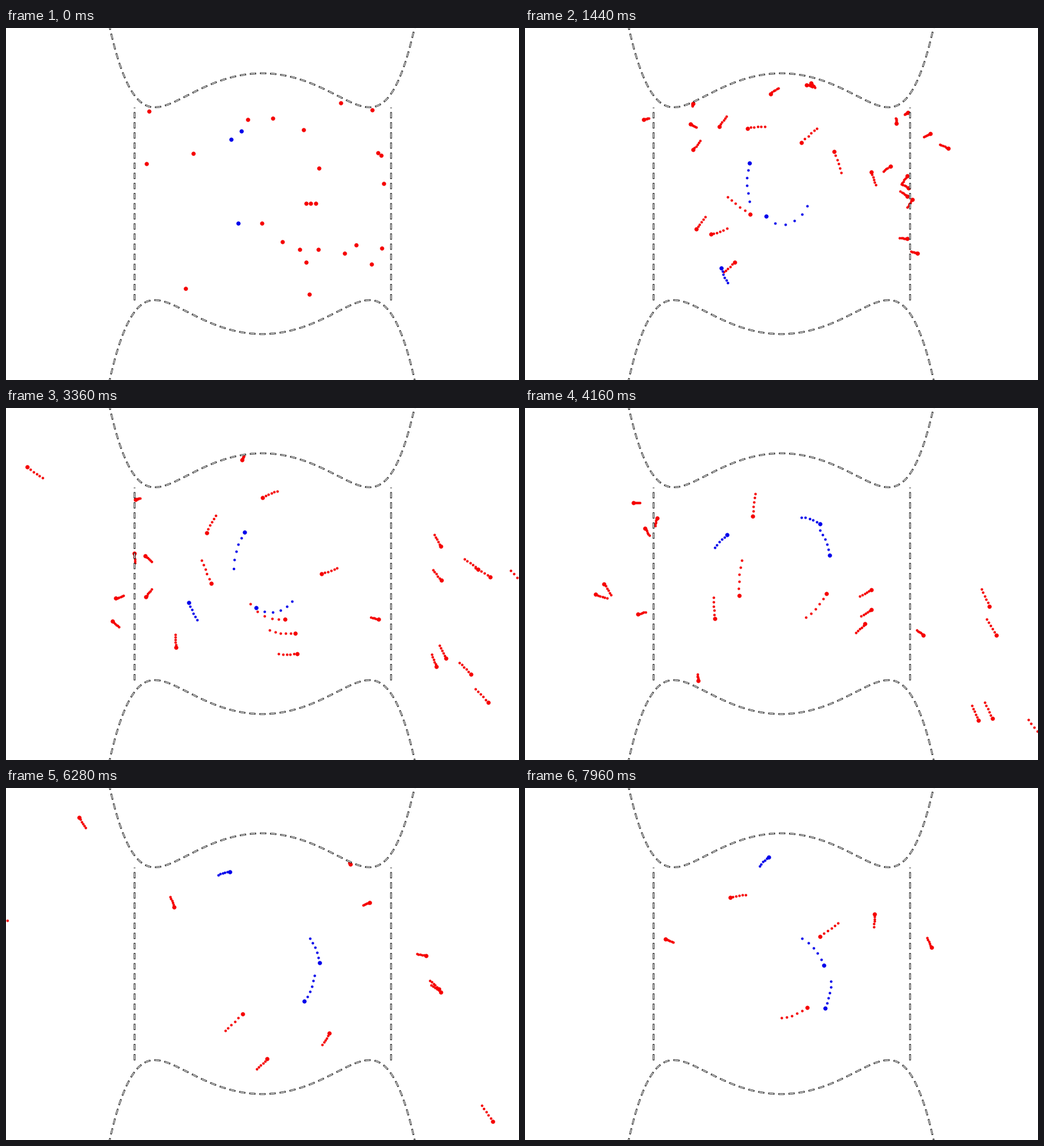
A matplotlib script that plays this animation: 800x550 px, repeating every 8 s.

```python
import numpy as np
import matplotlib.pyplot as plt
from matplotlib.animation import FuncAnimation

# Stars of equal Jacobi energy in a cluster's tidal field (Hill's equations).
# Lengths are in tidal radii; the stage spans 4 of them across and 2 down.
W, H, FRAMES, STEP = 800, 550, 200, 40
PX = 0.72                      # points per pixel at 100 dpi
CENTER = np.array([400.0, 275.0])
SCALE = np.array([200.0, 275.0])
DT, SUB = 0.0125, 8
ENERGY = 4.05
TAIL = 5
NOW = 65                       # frame at which the stars are laid out

# x, y and heading of the trail in degrees
RED = [
    (224, 138, 180), (285, 164, 74), (381, 88, 249), (377, 123, 169),
    (392, 144, 118), (365, 190, 112), (475, 135, 214), (254, 242, 123),
    (268, 257, 185), (266, 290, 96), (212, 269, 127), (214, 285, 240),
    (205, 356, 180), (342, 304, 81), (557, 218, 122), (529, 324, -3),
    (641, 159, 48), (633, 222, 32), (652, 321, 61), (644, 338, 65),
    (665, 361, 35), (685, 395, 38), (666, 212, 11), (676, 233, 0),
    (724, 197, 34), (760, 286, 51), (113, 138, 197)]
BLUE = [(465, 180, 54), (461, 267, 91), (379, 347, 118)]


def accel(p, v):
    """Central pull, tide along x and Coriolis term."""
    g = 3 / ((p**2).sum(1) + 1e-5) ** 1.5
    return np.column_stack([-2 * v[:, 1] + (3 - g) * p[:, 0],
                            2 * v[:, 0] - g * p[:, 1]])


def flow(p, v, n, sign=1):
    """Positions for n frames forward or backward (Runge-Kutta)."""
    h = sign * DT / SUB
    path = [p]
    for _ in range(n):
        for _ in range(SUB):
            a1 = accel(p, v)
            v2 = v + h / 2 * a1
            a2 = accel(p + h / 2 * v, v2)
            v3 = v + h / 2 * a2
            a3 = accel(p + h / 2 * v2, v3)
            v4 = v + h * a3
            a4 = accel(p + h * v3, v4)
            p = p + h / 6 * (v + 2 * v2 + 2 * v3 + v4)
            v = v + h / 6 * (a1 + 2 * a2 + 2 * a3 + a4)
        path.append(p)
    return np.array(path)


def velocity(p, angle):
    """Speed from the shared energy, pointing along a screen angle."""
    r = np.hypot(p[:, 0], p[:, 1])
    speed = np.sqrt(np.maximum(3 * p[:, 0]**2 + 6 / r - 2 * ENERGY, 0.02))
    way = np.column_stack([np.cos(angle), np.sin(angle)]) / SCALE
    return way * (speed / np.hypot(way[:, 0], way[:, 1]))[:, None]


def build(stars):
    """Screen tracks of all stars, shape (frame, star, 2)."""
    stars = np.array(stars, float)
    p = (stars[:, :2] - CENTER) / SCALE
    trail = np.radians(stars[:, 2])
    angle = trail.copy()
    for _ in range(15):        # turn until the trail lies as given
        d = (p - flow(p, velocity(p, angle), TAIL, -1)[-1]) * SCALE
        off = trail - np.arctan2(d[:, 1], d[:, 0])
        angle += 0.6 * np.arctan2(np.sin(off), np.cos(off))
    v = velocity(p, angle)
    past = flow(p, v, NOW, -1)[:0:-1]
    ahead = flow(p, v, FRAMES - 1 - NOW)
    return np.concatenate([past, ahead]) * SCALE + CENTER


plt.rcParams["lines.scale_dashes"] = False
fig = plt.figure(figsize=(W / 100, H / 100), dpi=100, facecolor="white")
ax = fig.add_axes([0, 0, 1, 1])
ax.set_xlim(0.5, W + 0.5)
ax.set_ylim(H + 0.5, 0.5)
ax.axis("off")

DASH, PERIOD = 9.6, 15.8


def dashed(x, y, phase=0.0):
    """Hollow dashes: black bars with a thin white core."""
    for color, width, inset in (("black", 2.6, 0), ("white", 1.2, 1)):
        on = DASH - 2 * inset
        pattern = (on * PX, (PERIOD - on) * PX)
        ax.plot(x, y, color=color, lw=width * PX, zorder=3,
                linestyle=(((phase - inset) % PERIOD) * PX, pattern),
                dash_capstyle="butt")


# Zero-velocity curves and the lines through the two saddle points
u = np.linspace(-1.2, 1.2, 961)
bound = np.sqrt((6 / (2 * ENERGY - 3 * u**2))**2 - u**2)
for side in (-1, 1):
    x, y = CENTER[0] + SCALE[0] * u, CENTER[1] + side * SCALE[1] * bound
    run = np.append(0, np.cumsum(np.hypot(np.diff(x), np.diff(y))))
    dashed(x, y, -np.interp(402, x, run))
    wall = CENTER[0] + side * SCALE[0]
    dashed([wall, wall], CENTER[1] + SCALE[1] * bound.min() * np.array([1, -1]))


def dots(color, size):
    return ax.plot([], [], "o", color=color, ms=size * PX, mew=0,
                   zorder=2, antialiased=False)[0]


LAYERS = [(build(stars), dots(color, 4), dots(color, 6.5))
          for stars, color in ((RED, "#f50000"), (BLUE, "#0000eb"))]


def update(k):
    for tracks, trail, heads in LAYERS:
        past = tracks[max(0, k - TAIL):k + 1].reshape(-1, 2)
        trail.set_data(past[:, 0], past[:, 1])
        heads.set_data(tracks[k, :, 0], tracks[k, :, 1])
    return [art for layer in LAYERS for art in layer[1:]]


anim = FuncAnimation(fig, update, frames=FRAMES, init_func=lambda: update(0),
                     interval=STEP, repeat=True, repeat_delay=0, blit=False)
plt.show()
```
